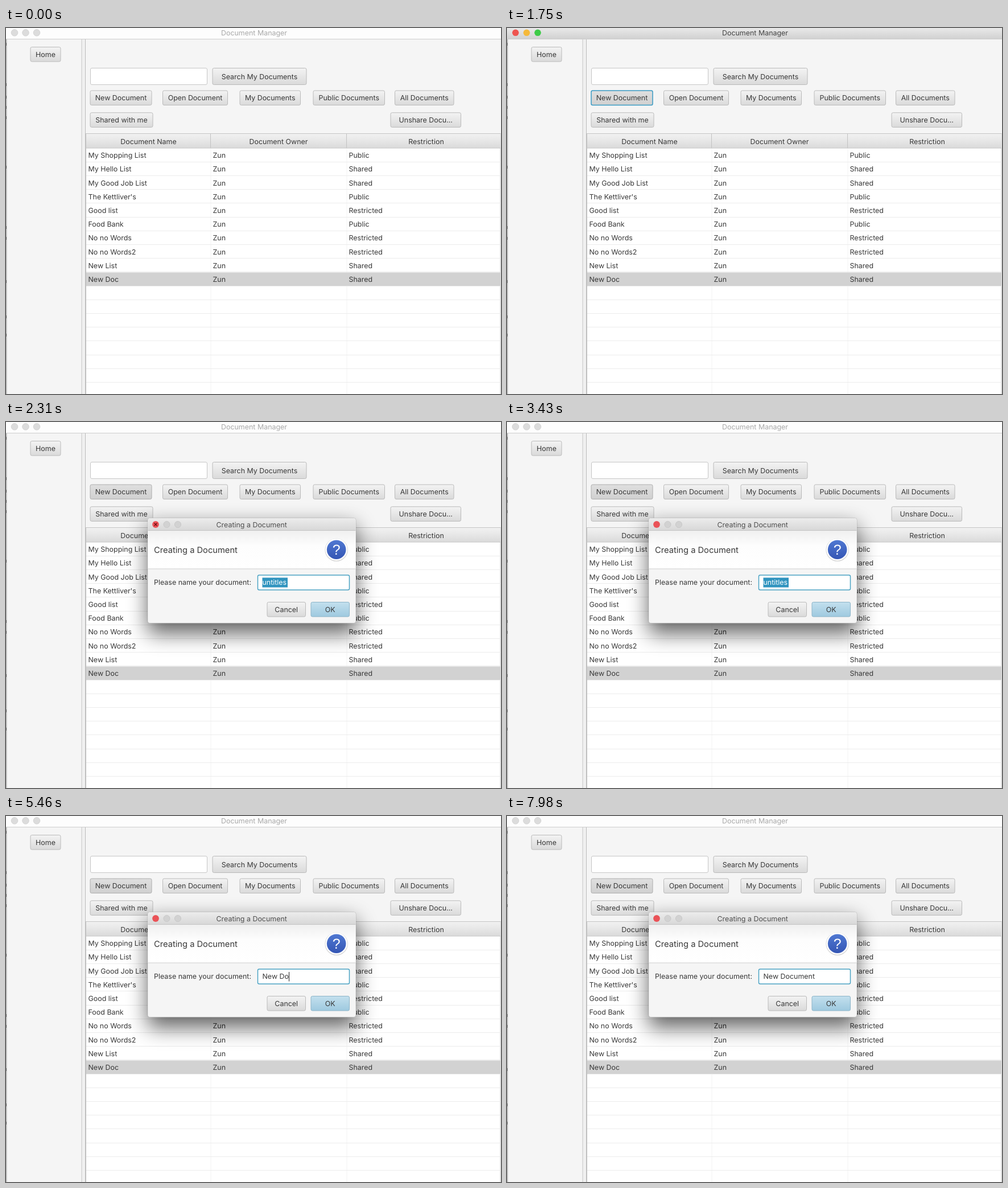
An HTML page that plays this animation: 870 by 643 pixels, repeating every 8 s.

```html
<!DOCTYPE html>
<html lang="en">
<head>
<meta charset="utf-8">
<title>Document Manager</title>
<style>
  html, body { margin: 0; width: 100%; height: 100%; overflow: hidden; background: #f5f5f5; }
  svg { display: block; width: 870px; height: 643px; }
  text {
    font: 12.45px Inter, "Liberation Sans", sans-serif;
    fill: #383838; white-space: pre; text-rendering: geometricPrecision;
  }
  .mid { text-anchor: middle; }
  .btn rect { fill: url(#face); stroke: #bababa; }
  .btn.hover rect { fill: url(#faceHover); }
  .btn.pressed rect { fill: url(#facePressed); stroke: #adadad; }
  .btn.focused rect { stroke: #3a9bc4; stroke-width: 1.5; }
  .btn.primary rect { fill: url(#faceBlue); stroke: #8db4c8; }
  #bar { fill: #fdfdfd; }
  #bar.active { fill: url(#barActive); }
  #heading { fill: #a9a9a9; }
  #heading.active { fill: #444; }
  #lights circle { fill: #dcdcdc; stroke: #cfcfcf; stroke-width: .8; }
  #lights.active circle { stroke: none; }
  #lights.active circle:nth-child(1) { fill: #ee5550; }
  #lights.active circle:nth-child(2) { fill: #f5b93a; }
  #lights.active circle:nth-child(3) { fill: #3ecb48; }
</style>
</head>
<body>
<svg id="stage" viewBox="0 0 870 643">
  <defs id="defs">
    <filter id="shadow" x="-30%" y="-50%" width="160%" height="200%">
      <feGaussianBlur stdDeviation="18"/>
    </filter>
  </defs>
  <g id="main"></g>
  <g id="dialog"></g>
</svg>
<script>
const NS = 'http://www.w3.org/2000/svg';
const $ = id => document.getElementById(id);
const main = $('main'), dialog = $('dialog');

function add(parent, tag, attrs, content) {
  const el = document.createElementNS(NS, tag);
  for (const k in attrs) el.setAttribute(k, attrs[k]);
  if (content !== undefined) el.textContent = content;
  return parent.appendChild(el);
}
const rect = (p, x, y, width, height, fill, more) =>
  add(p, 'rect', { x, y, width, height, fill, ...more });
const line = (p, x1, y1, x2, y2, stroke) =>
  add(p, 'line', { x1, y1, x2, y2, stroke });
const text = (p, x, y, str, more) => add(p, 'text', { x, y, ...more }, str);
const label = (p, x, y, str, more) => text(p, x, y, str, { class: 'mid', ...more });
const dot = (p, cx, cy, r, fill, more) => add(p, 'circle', { cx, cy, r, fill, ...more });

function gradient(id, ...stops) {
  const g = add($('defs'), 'linearGradient', { id, x1: 0, y1: 0, x2: 0, y2: 1 });
  stops.forEach(([offset, color]) => add(g, 'stop', { offset, 'stop-color': color }));
}

function button(p, x, y, w, h, str, kind = '') {
  const g = add(p, 'g', { class: 'btn ' + kind });
  add(g, 'rect', { x: x + .5, y: y + .5, width: w - 1, height: h - 1, rx: 2.5 });
  label(g, x + w / 2, y + h / 2 + 4.5, str);
  return g;
}

gradient('face', [0, '#f3f3f3'], [.45, '#e8e8e8'], [1, '#dadada']);
gradient('faceHover', [0, '#fcfcfc'], [1, '#ebebeb']);
gradient('facePressed', [0, '#dfdfdf'], [1, '#d0d0d0']);
gradient('faceBlue', [0, '#c3e0ee'], [1, '#9ec9df']);
gradient('barActive', [0, '#e9e9e9'], [1, '#d1d1d1']);
gradient('head', [0, '#f1f1f1'], [.35, '#eaeaea'], [1, '#dadada']);
gradient('dialogBar', [0, '#ececec'], [1, '#d8d8d8']);
gradient('dialogHead', [0, '#f0f0f0'], [.4, '#fdfdfd'], [1, '#fff']);
gradient('badge', [0, '#4f78d2'], [1, '#3556b4']);

// Window frame
rect(main, 0, 0, 870, 643, '#f5f5f5');
add(main, 'rect', { id: 'bar', width: 870, height: 19 });
line(main, 0, 19.5, 870, 19.5, '#cdcdcd');
label(main, 436, 13, 'Document Manager', { id: 'heading' });
const lights = add(main, 'g', { id: 'lights' });
[15, 34.5, 54].forEach(x => dot(lights, x, 8.3, 5.8));
rect(main, 0, 20, 1.5, 623, '#b4b4b4');
[26, 97, 119, 137, 155, 242, 348, 367, 443, 505, 537].forEach(y => rect(main, 0, y, 1, 5, '#666'));

// Split pane divider
rect(main, 133, 20, 7, 623, '#f0f0f0');
line(main, 133, 20, 133, 643, '#c4c4c4');
line(main, 139.5, 20, 139.5, 643, '#bababa');

// Toolbar
button(main, 42.5, 33, 54, 26.5, 'Home');
rect(main, 148.5, 70.5, 205, 29, '#fff', { rx: 2.5, stroke: '#c6c6c6' });
button(main, 362.5, 70, 166, 30, 'Search My Documents');
const newBtn = button(main, 147.5, 109.5, 109, 26.5, 'New Document');
const openBtn = button(main, 275, 109.5, 115, 26.5, 'Open Document');
button(main, 410.5, 109.5, 107.5, 26.5, 'My Documents');
button(main, 539.5, 109.5, 126.5, 26.5, 'Public Documents');
button(main, 683, 109.5, 104.5, 26.5, 'All Documents');
button(main, 147.5, 148.3, 111, 26.5, 'Shared with me');
button(main, 675.5, 148.3, 124.5, 26.5, 'Unshare Docu...');

// Table
const rows = [
  ['My Shopping List', 'Public'], ['My Hello List', 'Shared'],
  ['My Good Job List', 'Shared'], ["The Kettliver's", 'Public'],
  ['Good list', 'Restricted'], ['Food Bank', 'Public'],
  ['No no Words', 'Restricted'], ['No no Words2', 'Restricted'],
  ['New List', 'Shared'], ['New Doc', 'Shared']
];
const top0 = 211.5, rowH = 24.2;
rect(main, 140.5, 185.5, 728.5, 460, '#fff', { stroke: '#c4c4c4' });
rect(main, 141, 186, 728, 25, 'url(#head)');
line(main, 141, 211, 869, 211, '#c6c6c6');
[359.5, 598.5].forEach(x => {
  line(main, x, 186, x, 211, '#c2c2c2');
  line(main, x + .5, 212, x + .5, 643, '#f3f3f3');
});
label(main, 250.5, 204, 'Document Name');
label(main, 479, 204, 'Document Owner');
label(main, 738.5, 204, 'Restriction');
for (let i = 1; i < 18; i++) {
  const y = Math.round(top0 + i * rowH) - .5;
  line(main, 141, y, 869, y, '#ececec');
}
rect(main, 141, 429.5, 728, 23.5, '#d2d2d2');
rows.forEach(([name, access], i) => {
  const y = 228.2 + i * rowH;
  text(main, 144.5, y, name);
  text(main, 363.5, y, 'Zun');
  text(main, 602.5, y, access);
});

// Dialog
rect(dialog, 249, 182, 366, 190, '#000', { opacity: .6, filter: 'url(#shadow)' });
rect(dialog, 249, 168.5, 366, 185, '#f5f5f5', { rx: 4, stroke: '#000', 'stroke-opacity': .14 });
add(dialog, 'path', { d: 'M249.5 190V173q0-4 4-4H610.5q4 0 4 4V190z', fill: 'url(#dialogBar)' });
line(dialog, 249.5, 190.5, 614.5, 190.5, '#c3c3c3');
dot(dialog, 263, 180, 5.9, '#ea5257');
[282.5, 302].forEach(x => dot(dialog, x, 180, 5.6, '#d2d2d2', { stroke: '#c4c4c4', 'stroke-width': .8 }));
const cross = add(dialog, 'path', {
  d: 'M260.5 177.5l5 5m0-5l-5 5', stroke: '#6b0d12', 'stroke-width': 1.4
});
label(dialog, 431.7, 184.8, 'Creating a Document', { style: 'fill:#505050' });
rect(dialog, 249.5, 191, 365, 67, 'url(#dialogHead)');
line(dialog, 249.5, 258, 614.5, 258, '#cdcdcd');
text(dialog, 260, 230, 'Creating a Document', { style: 'font-size:14.7px' });
dot(dialog, 580.7, 224.8, 20.2, '#d8d8d8');
dot(dialog, 580.7, 224.2, 19.3, '#fff');
dot(dialog, 580.7, 224.2, 16.8, 'url(#badge)');
label(dialog, 580.7, 233, '?', { style: 'font:25px "Liberation Sans",sans-serif;fill:#fff' });
text(dialog, 260, 286.2, 'Please name your document:');
rect(dialog, 442.5, 269, 161, 26, '#fff', { rx: 2.5, stroke: '#4ba3c4', 'stroke-width': 1.5 });
const selection = rect(dialog, 450.5, 273.5, 44.5, 17, '#3094bf');
const input = text(dialog, 450.5, 286.2, '');
const caret = rect(dialog, 0, 274, 1, 16.5, '#222');
button(dialog, 458.5, 316, 68.5, 26.5, 'Cancel');
button(dialog, 535.5, 316, 68.5, 26.5, 'OK', 'primary');

// Timeline, in ms
const LOOP = 8000;
const HOVER = 630, LEAVE = 1330, PRESS = 1680, OPEN = 2240, CROSS_END = 3080;
const ANSWER = 'New Document';
const KEYS = [4200, 4480, 4690, 4900, 5110, 5320, 5600, 5880, 6160, 6440, 6720, 6930];

const show = (el, on) => el.setAttribute('visibility', on ? 'inherit' : 'hidden');

function render(t) {
  const active = t >= PRESS && t < OPEN;
  ['bar', 'heading', 'lights'].forEach(id => $(id).classList.toggle('active', active));
  openBtn.classList.toggle('hover', t >= HOVER && t < LEAVE);
  newBtn.classList.toggle('hover', t >= LEAVE && t < PRESS);
  newBtn.classList.toggle('pressed', t >= PRESS);
  newBtn.classList.toggle('focused', active);

  dialog.setAttribute('visibility', t >= OPEN ? 'visible' : 'hidden');
  show(cross, t < CROSS_END);
  const typed = KEYS.filter(k => t >= k).length;
  const value = typed ? ANSWER.slice(0, typed) : 'untitles';
  if (input.textContent !== value) input.textContent = value;
  input.style.fill = typed ? '#383838' : '#fff';
  show(selection, !typed);
  show(caret, typed && (t + 850) % 1000 < 500);
  caret.setAttribute('x', 450.5 + input.getComputedTextLength());
}

const start = performance.now();
function tick() {
  render((performance.now() - start) % LOOP);
  requestAnimationFrame(tick);
}
tick();
</script>
</body>
</html>
```
